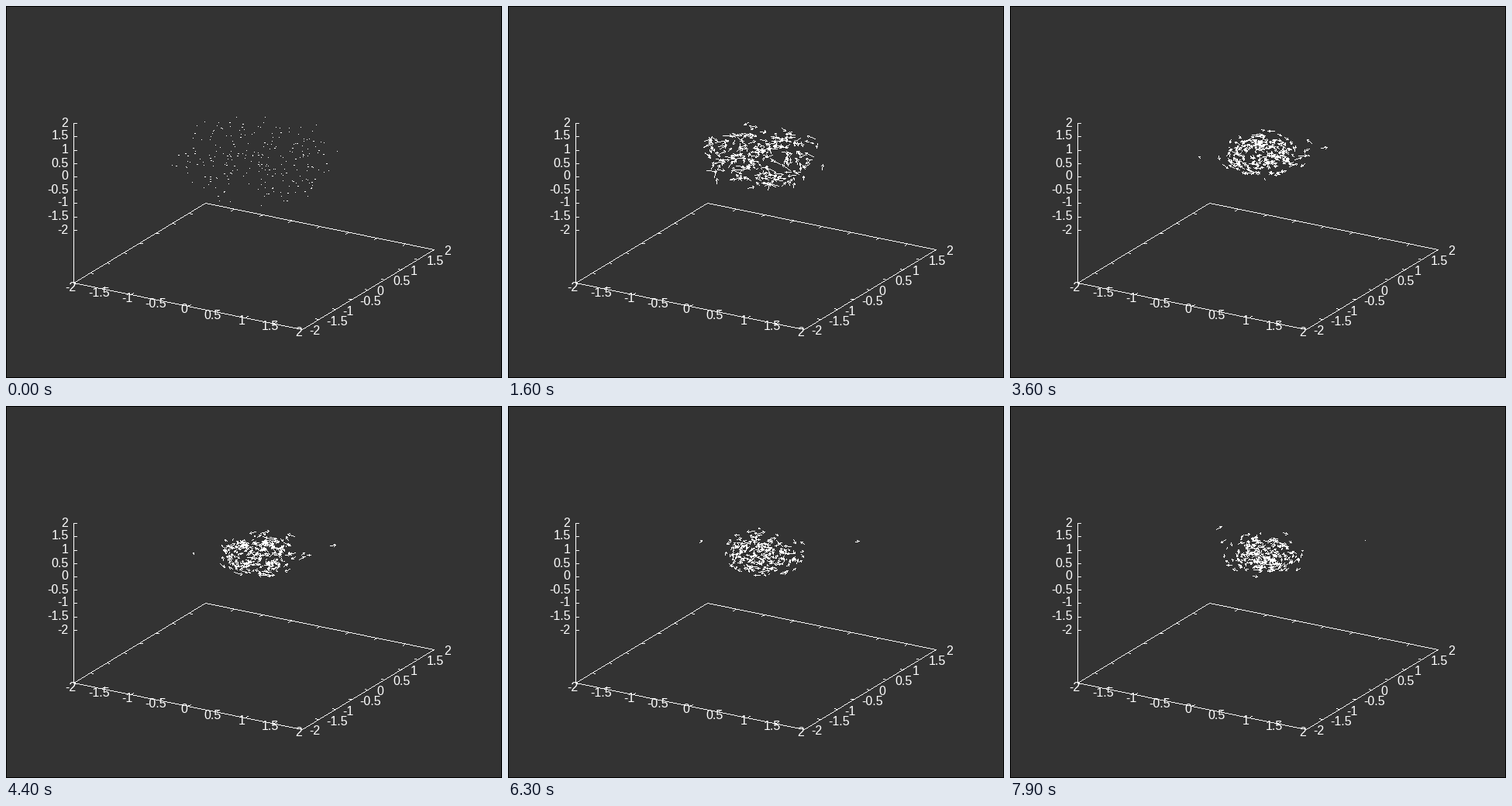
A matplotlib script that plays this animation: 640x480 px, repeating every 8 s.

```python
import numpy as np
import matplotlib.pyplot as plt
from matplotlib.animation import FuncAnimation

W, H, DPI = 640, 480, 80
FRAMES, STEP = 80, 100
N = 238
ARROW = 3.6
PAPER, INK = 51, 255

# Screen vectors of one unit along x, y and z
BASIS = np.array([[73.75, 15.0], [42.5, -25.75], [0.0, -34.4]])
FLOOR = np.array([319.5, 335.5])

rng = np.random.default_rng(11)


def unit(v):
    return v / np.linalg.norm(v, axis=1, keepdims=True)


def clock(t):
    """Time that sets off from rest."""
    return np.hypot(t, 10) - 10


# Uniform ball of bodies, each on its own ellipse spanned by start and side
start = unit(rng.normal(size=(N, 3))) * 1.34 * np.cbrt(rng.random((N, 1)))
side = unit(np.cross(start, rng.normal(size=(N, 3))))
side *= np.linalg.norm(start, axis=1, keepdims=True) * rng.uniform(0.7, 1, (N, 1))
omega = rng.uniform(0.04, 0.07, (N, 1))
rest = 0.34 + 0.26 * rng.random((N, 1)) ** 3


def cloud(t):
    """Swarm that contracts, each body towards its own share of its orbit."""
    phase = omega * clock(t)
    shrink = rest + (1 - rest) / (1 + (t / 20) ** 2)
    pos = shrink * (start * np.cos(phase) + side * np.sin(phase))
    drift = min(abs(t) / 28, 1)
    return pos @ BASIS + (322 + 4 * drift, 197 - 5 * drift)


def escapee(t):
    """Body thrown out to the right, slowing to a stop."""
    ease = np.sin(np.pi / 2 * abs(t) / FRAMES) ** 1.5
    return np.array([338 + 120 * ease, 195 - 22 * ease])


def wanderer(t):
    """Body that swings round the left side of the swarm."""
    u = clock(t) / clock(FRAMES)
    a, b, c = np.array([(285, 205), (207, 200), (268, 158)])
    return (1 - u) ** 2 * a + 2 * u * (1 - u) * b + u * u * c


def bodies(t):
    return np.vstack([cloud(t), escapee(t), wanderer(t)])


def arrows(t):
    tail = bodies(t)
    vel = (bodies(t + 0.1) - bodies(t - 0.1)) / 0.2 * ARROW + (0.25, 0)
    size = np.linalg.norm(vel, axis=1, keepdims=True)
    tip = tail + vel
    aim = vel / size
    across = aim[:, ::-1] * (-1, 1)
    head = np.where(size < 2, 0, np.minimum(2.6, 0.5 * size))
    barbs = [tip - head * (0.87 * aim + s * 0.5 * across) for s in (-1, 1)]
    return np.concatenate([np.stack([end, tip], axis=1) for end in (tail, *barbs)])


def stroke(canvas, segs, tone=INK):
    """One-pixel lines without smoothing."""
    for a, b in np.rint(segs).astype(int):
        n = max(abs(b - a)) + 1
        x = np.rint(np.linspace(a[0], b[0], n)).astype(int)
        y = np.rint(np.linspace(a[1], b[1], n)).astype(int)
        canvas[y, x] = tone


def label(x, y, value, ha):
    ax.text(x, y, f"{value:g}", color="white", ha=ha, va="baseline",
            family="Liberation Sans", size=16 * 72 / DPI)


def floor(x, y):
    return FLOOR + np.array([x, y]) @ BASIS[:2]


fig = plt.figure(figsize=(W / DPI, H / DPI), dpi=DPI, facecolor="#333333")
ax = fig.add_axes([0, 0, 1, 1])
ax.set_axis_off()

base = np.full((H, W), PAPER, np.uint8)
base[[0, -1], :] = 0
base[:, [0, -1]] = 0

corners = [floor(*c) for c in ((-2, -2), (2, -2), (2, 2), (-2, 2), (-2, -2))]
segs = list(zip(corners, corners[1:]))
segs.append([(87, 151), (87, 357)])

along_x, along_y = (4 * v / np.linalg.norm(v) for v in BASIS[:2])
for i, v in enumerate(np.linspace(-2, 2, 9)):
    for root, step in ((floor(v, -2), along_y), (floor(v, 2), -along_y),
                       (floor(-2, v), along_x), (floor(2, v), -along_x)):
        segs.append([root, root + step])
    z = round(289 - 17.25 * i)
    segs.append([(87, z), (91, z)])
    label(80, z + 4, v, "right")
    label(82.5 + 36.8 * i, 367 + 7.25 * i, v, "center")
    label(390.7 + 21.7 * i, 424 - 12.9 * i, v, "left")
stroke(base, segs)

view = ax.imshow(base, cmap="gray", vmin=0, vmax=255, interpolation="nearest",
                 aspect="auto")


def draw(i):
    canvas = base.copy()
    stroke(canvas, arrows(i))
    view.set_data(canvas)
    return [view]


anim = FuncAnimation(fig, draw, frames=FRAMES, interval=STEP, repeat=True,
                     repeat_delay=0, blit=False)
plt.show()
```
